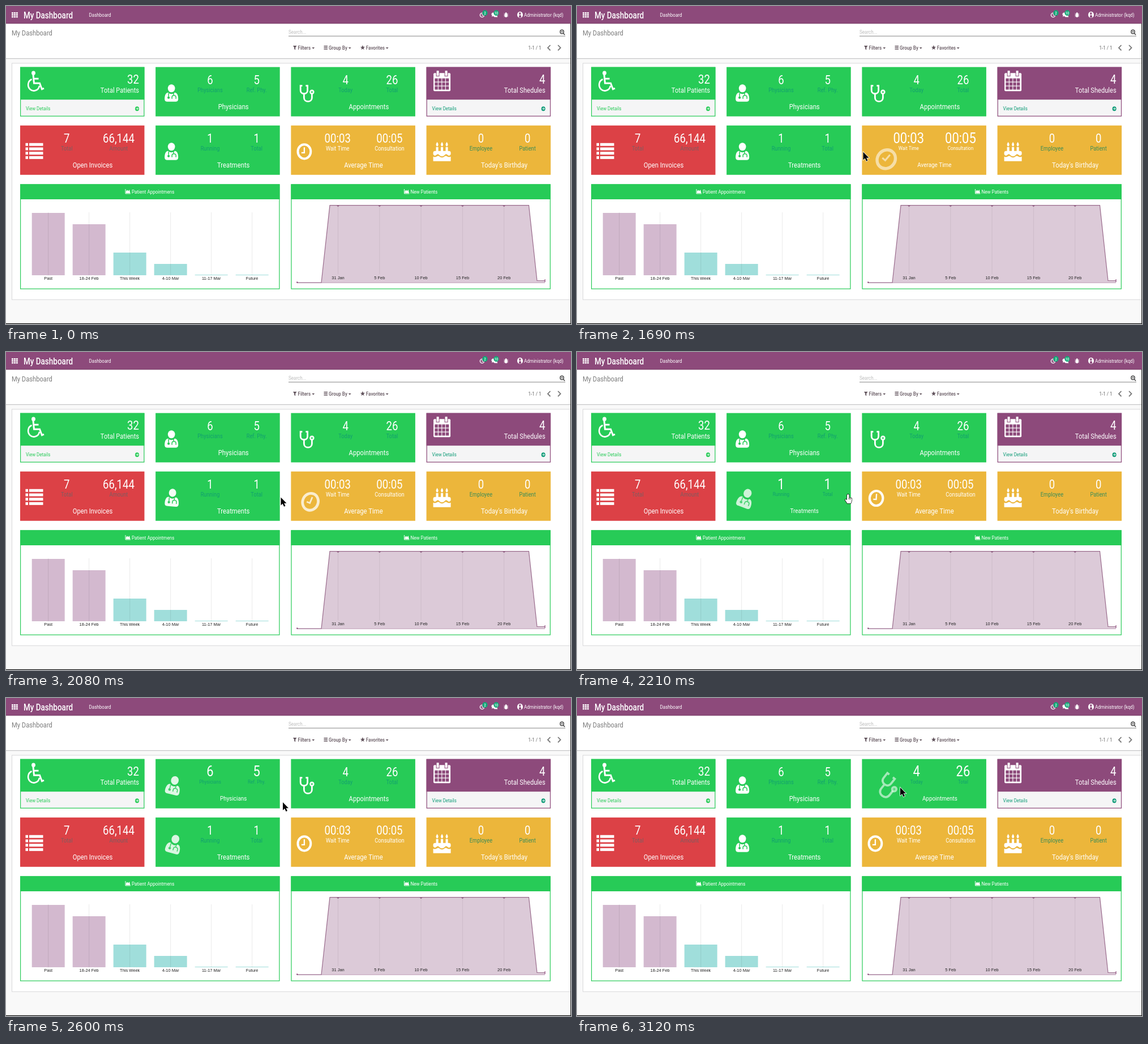
An HTML page with a canvas that plays this animation: 998 by 561 pixels, repeating every 3.25 s.

```html
<!DOCTYPE html>
<html>
<head>
<meta charset="utf-8">
<title>My Dashboard</title>
<style>
html, body { margin: 0; width: 100%; height: 100%; overflow: hidden; background: #f9f9f9; }
canvas { display: block; width: 998px; height: 561px; }
</style>
</head>
<body>
<canvas id="stage" width="998" height="561"></canvas>
<script>
const ctx = document.getElementById('stage').getContext('2d');
const GREEN = '#27cb57', RED = '#dc4146', YELLOW = '#ecb63b', PURPLE = '#8d4a7b', TEAL = '#12a06f';
const SQUEEZE = 0.86; // the whole interface is shown slightly narrowed
const LOOP = 3250, START = 1430, STEP = 130;

function box(x, y, w, h, color) {
  ctx.fillStyle = color;
  ctx.fillRect(x, y, w, h);
}
function frame(x, y, w, h, color, width = 1.2) {
  ctx.strokeStyle = color;
  ctx.lineWidth = width;
  ctx.strokeRect(x, y, w, h);
}
function disc(x, y, r, color, ry = r) {
  ctx.fillStyle = color;
  ctx.beginPath();
  ctx.ellipse(x, y, r, ry, 0, 0, 7);
  ctx.fill();
}
function fill(d, color) {
  ctx.fillStyle = color;
  ctx.fill(new Path2D(d));
}
function line(d, color, width) {
  ctx.strokeStyle = color;
  ctx.lineWidth = width;
  ctx.stroke(new Path2D(d));
}
function text(str, x, y, size, color, align = 'left', weight = 400) {
  ctx.save();
  ctx.translate(x, y);
  ctx.scale(SQUEEZE, 1);
  ctx.font = `${weight} ${size}px Roboto, sans-serif`;
  ctx.textAlign = align;
  ctx.fillStyle = color;
  ctx.fillText(str, 0, 0);
  ctx.restore();
}
function label(str, x, y) {
  ctx.font = '7.5px "Liberation Sans", Arial, sans-serif';
  ctx.textAlign = 'center';
  ctx.fillStyle = '#222';
  ctx.fillText(str, x, y);
}
function at(x, y, draw, turn = 0, scale = 1, alpha = 1) {
  ctx.save();
  ctx.translate(x, y);
  ctx.rotate(turn);
  ctx.scale(scale, scale);
  ctx.globalAlpha = alpha;
  draw();
  ctx.restore();
}

// Icons are drawn around their own centre.
const icons = {
  wheelchair() {
    disc(-4, -14, 3.4, '#fff', 3.8);
    line('M-4.5-11L-3 4H7L11 14.5L14.5 13M-4-4H5', '#fff', 3);
    line('M-7-3A10 10.5 0 1 0 6.5 8.5', '#fff', 2.6);
  },
  doctor() {
    disc(0, -8.5, 6.3, '#fff', 7);
    fill('M-6-1C-10-1-12 4-12 10C-12 14-10 15-7 15H7C10 15 12 14 12 10C12 4 10-1 6-1Q0 4-6-1Z', '#fff');
    line('M-5 0V6M4 0V4M1 10V7Q1 4 4 4Q8 4 8 7V10', GREEN, 1.5);
    disc(-5, 8, 2.1, GREEN);
  },
  stethoscope() {
    line('M-8-13H-11.2V-5C-11.2 3 1.2 3 1.2-5V-13H-2M-5 1V8C-5 17 9 17 9 8V1', '#fff', 2.8);
    disc(9, -2, 4.2, '#fff');
    disc(9, -2, 1.5, GREEN);
  },
  clock() {
    ctx.beginPath();
    ctx.ellipse(0, 0, 11.4, 12.6, 0, 0, 7);
    ctx.strokeStyle = '#fff';
    ctx.lineWidth = 4;
    ctx.stroke();
    line('M0-7.5V2H-5', '#fff', 2.3);
  },
  list() {
    for (let y = -14; y < 14; y += 7.7) {
      box(-15.5, y, 4.5, 5, '#fff');
      box(-9, y, 24.5, 5, '#fff');
    }
  },
  cake() {
    for (const x of [-8.5, 0, 8.5]) {
      box(x - 2, -8, 4, 8, '#fff');
      fill(`M${x}-17Q${x + 4}-11 ${x}-9Q${x - 4}-11 ${x}-17Z`, '#fff');
    }
    fill('M-15.5 5V2Q-15.5-1-12-1H12Q15.5-1 15.5 2V5Q13 9 10 6Q7 3 5 6Q0 11-5 6Q-7 3-10 6Q-13 9-15.5 5Z', '#fff');
    fill('M-15.5 9Q-12 11-8 8Q-6 7-4 9Q0 12 4 9Q6 7 8 8Q12 11 15.5 9V17H-15.5Z', '#fff');
  },
  calendar() {
    fill('M-13-14H13Q15-14 15-12V16Q15 18 13 18H-13Q-15 18-15 16V-12Q-15-14-13-14Z', '#fff');
    for (let r = 0; r < 3; r++)
      for (let c = 0; c < 4; c++) box(-12.7 + c * 6.5, -4.5 + r * 7, 5.4, 5.8, PURPLE);
    for (const x of [-7.5, 7.5]) {
      box(x - 3, -18, 6, 10, PURPLE);
      box(x - 2, -18, 4, 9, '#fff');
    }
  }
};

// lit: steps with the hover style; pose: hover amount from step `from` onwards.
const cards = [
  { col: 0, row: 0, color: GREEN, icon: 'wheelchair', count: 32, title: 'Total Patients', link: GREEN },
  { col: 1, row: 0, color: GREEN, icon: 'doctor', ix: 28, iy: 46, stats: [['6', 'Physicians'], ['5', 'Ref. Phy.']],
    title: 'Physicians', ink: TEAL, lit: [9, 10], from: 9, pose: [.3, .45, .15], shift: [13, 2], grow: .25 },
  { col: 2, row: 0, color: GREEN, icon: 'stethoscope', ix: 28, iy: 46, stats: [['4', 'Today'], ['26', 'Total']],
    title: 'Appointments', ink: TEAL, lit: [12, 13], from: 12, pose: [.4, .85], shift: [21, 2], grow: .4 },
  { col: 3, row: 0, color: PURPLE, icon: 'calendar', count: 4, title: 'Total Shedules', link: '#109c78' },
  { col: 0, row: 1, color: RED, icon: 'list', ix: 25, iy: 45, near: 1, stats: [['7', 'Total'], ['66,144', 'Amount']],
    title: 'Open Invoices', ink: '#7f5c60' },
  { col: 1, row: 1, color: GREEN, icon: 'doctor', ix: 28, iy: 46, stats: [['1', 'Running'], ['1', 'Total']],
    title: 'Treatments', ink: TEAL, lit: [6, 8], from: 5, pose: [.1, .45, .8, .75, .35, .1], shift: [13, 3], grow: .25 },
  { col: 2, row: 1, color: YELLOW, icon: 'clock', ix: 23.5, iy: 46, near: 1, stats: [['00:03', 'Wait Time'], ['00:05', 'Consultation']],
    title: 'Average Time', ink: '#fff', lit: [1, 4], from: 1, pose: [.5, .9, 1, 1, .5, .08], shift: [21.5, 15], grow: .4 },
  { col: 3, row: 1, color: YELLOW, icon: 'cake', ix: 27.5, iy: 46, stats: [['0', 'Employee'], ['0', 'Patient']],
    title: "Today's Birthday", ink: '#3a8c58' }
];

function roundArrow(x, y, color) {
  disc(x, y, 3.5, color, 4);
  line(`M${x - 2} ${y}H${x + 1.6}M${x} ${y - 2}L${x + 2} ${y}L${x} ${y + 2}`, '#fff', 1);
}

function drawCard(card, step) {
  const x = 25 + card.col * 239.2, y = 107.7 + card.row * 103.1;
  if (card.link) {
    box(x, y, 219.5, 87, '#f5f5f6');
    box(x, y, 219.5, 57.5, card.color);
    frame(x + .6, y + .6, 218.3, 86, card.color);
    at(x + 27.5, y + 24.5, icons[card.icon]);
    text(card.count, x + 210, y + 29.7, 21.7, '#fff', 'right');
    text(card.title, x + 210, y + 45.7, 12.9, '#fff', 'right');
    text('View Details', x + 10, y + 76.7, 9.2, card.link);
    roundArrow(x + 206.5, y + 73.5, card.link);
    return;
  }
  box(x, y, 219.5, 87, card.color);
  const p = (card.pose && card.pose[step - card.from]) || 0;
  const [dx, dy] = card.shift || [0, 0];
  const lit = card.lit && step >= card.lit[0] && step <= card.lit[1];
  at(x + card.ix + dx * p, y + card.iy + dy * p, icons[card.icon], p * Math.PI / 4, 1 + (card.grow || 0) * p, 1 - .5 * p);
  card.stats.forEach(([value, name], i) => {
    const cx = x + (card.near ? 82.3 : 96.3) + i * (card.near ? 91.7 : 82.2);
    text(value, cx, y + (lit ? 30.7 : 29.9), lit ? 25.5 : 21.6, '#fff', 'center');
    text(name, cx, y + (lit ? 43.4 : 43.8), lit ? 9.4 : 10.8, card.ink, 'center');
  });
  text(card.title, x + (card.near ? 128 : 137.5), y + (lit ? 73.6 : 74.2), lit ? 11.5 : 13.1, '#fff', 'center');
}

function drawHeader() {
  box(0, 0, 998, 31, PURPLE);
  box(0, 30.5, 998, 1, '#743c65');
  for (let i = 0; i < 9; i++) box(10 + i % 3 * 3.9, 11 + (i / 3 | 0) * 3.4, 3, 2.6, '#fff');
  text('My Dashboard', 31, 21.6, 15.7, '#fff', 'left', 500);
  text('Dashboard', 146.5, 19, 9.4, '#fff');

  ctx.beginPath();
  ctx.arc(841, 16, 3.6, 0, 7);
  ctx.strokeStyle = '#fff';
  ctx.lineWidth = 1.4;
  ctx.stroke();
  line('M841 13.5V16.5H843', '#fff', 1);
  disc(861.5, 14.5, 4, '#fff', 3);
  disc(864.5, 17, 3.5, '#fff', 2.6);
  fill('M859 16L858 19L862 17ZM865 18L868 20.5L867 17Z', '#fff');
  for (const [x, n] of [[846, 2], [866, 10]]) {
    disc(x, 12.3, 4.6, '#13a777', 5);
    text(n, x, 14.7, 6.5, '#fff', 'center', 500);
  }
  disc(883.2, 16.5, 2.5, '#fff', 3.4);
  disc(883.2, 12.8, 1.6, '#fff');
  line('M879.5 13L887 19M887 13L879.5 19M879 16H887.5', '#fff', .8);
  disc(908, 15.5, 5, '#fff', 5.8);
  disc(907.8, 13.2, 1.5, PURPLE, 2.2);
  fill('M906 20.5Q905.5 16 908 16Q910.5 16 910 20.5Z', PURPLE);
  text('Administrator (kqd)', 915, 19, 9.4, '#fff');
}

function drawControls() {
  box(0, 31.5, 998, 61, '#fff');
  box(0, 92, 998, 1.3, '#c9c9cb');
  text('My Dashboard', 10, 51.8, 13, '#7d7d7d');
  text('Search...', 499, 49.2, 9.4, '#bdbdbd');
  box(499, 52.6, 489, 1, '#858585');
  ctx.beginPath();
  ctx.arc(982, 45.5, 3.2, 0, 7);
  ctx.strokeStyle = '#444';
  ctx.lineWidth = 1.4;
  ctx.stroke();
  line('M984.3 48L987 51M980.5 45.5H983.5', '#444', 1.4);

  const gray = '#64565f';
  fill('M507 70H513.5L511.2 73.3V77.5L509.2 76V73.3Z', gray);
  for (const y of [70, 72.7, 75.4]) box(561.5, y, 6.5, 1.4, gray);
  fill('M630 69L631.2 72H634L631.8 74L632.6 77L630 75.4L627.4 77L628.2 74L626 72H628.8Z', gray);
  for (const [name, x, caret] of [['Filters', 515.5, 542.8], ['Group By', 570, 607.2], ['Favorites', 635.8, 673.2]]) {
    text(name, x, 76.8, 9.4, gray, 'left', 500);
    fill(`M${caret - 2.4} 73H${caret + 2.4}L${caret} 75.8Z`, gray);
  }
  text('1-1 / 1', 922.5, 77, 9.4, '#666');
  line('M961.5 69L957 73.7L961.5 78.4M975 69L979.5 73.7L975 78.4', '#777', 1.8);
}

function drawPanel(x, title, iconX) {
  box(x, 314.3, 458.5, 185.2, '#fff');
  frame(x + .6, 315, 457.3, 184, GREEN);
  box(x, 314.3, 458.5, 26.7, GREEN);
  line(`M${iconX} 323V331H${iconX + 9}`, '#fff', 1);
  fill(`M${iconX + 1} 330V327L${iconX + 3} 324.5L${iconX + 5} 326.5L${iconX + 7} 324L${iconX + 8.5} 330Z`, '#fff');
  text(title, iconX + 11, 330.5, 9.4, '#fff');
}

function drawBars() {
  drawPanel(25, 'Patient Appointmens', 211);
  const bars = [['Past', 365], ['18-24 Feb', 385], ['This Week', 435], ['4-10 Mar', 455], ['11-17 Mar', 474], ['Future', 474]];
  bars.forEach(([name, top], i) => {
    const x = 74.7 + i * 72;
    box(x - 29, top, 58, 475 - top, i < 2 ? '#d3b9cf' : '#a0dedb');
    box(x - .5, 364, 1, 111, 'rgba(0,0,0,.085)');
    label(name, x, 482.6);
  });
}

function drawArea() {
  drawPanel(503.4, 'New Patients', 703.5);
  const curve = 'M514 488H557L572 351.7H923.5L938 484.5H952';
  fill(curve + 'V488Z', '#dccad8');
  box(514, 487.8, 438, .8, '#b38ba9');
  ['31 Jan', '5 Feb', '10 Feb', '15 Feb', '20 Feb'].forEach((name, i) => {
    const x = 586.5 + i * 73.3;
    box(x - .5, 352, 1, 121, 'rgba(0,0,0,.07)');
    fill(`M${x - 2.5} 352H${x + 2.5}L${x} 354.3Z`, '#8f5f82');
    label(name, x, 482);
  });
  line(curve, '#9a6c8d', 1.2);
  disc(514.3, 487.5, 1.2, PURPLE);
  line('M952 482V487', PURPLE, 1.2);
}

// Pointer stops: step, x, y.
const stops = [[0, 519, 254], [4, 492, 261], [6, 479, 252], [8, 474, 191], [11, 519, 170], [13, 571, 158]];

function drawPointer(step) {
  if (step < 0) return;
  const i = Math.max(1, stops.findIndex(s => s[0] >= step));
  const [s0, x0, y0] = stops[i - 1], [s1, x1, y1] = stops[i];
  const k = (step - s0) / (s1 - s0);
  const hand = step === 6 || step === 7;
  const shape = hand
    ? 'M-2 1Q-2-1 0-1Q1.5-1 1.5 1V5L6 6Q7 7 6 11L4.5 15H-1.5L-5.5 9Q-5 7-2 9Z'
    : 'M0 0V14L3.2 11L5.6 16.2L8 15L5.6 10.2H10Z';
  at(x0 + (x1 - x0) * k, y0 + (y1 - y0) * k, () => {
    line(shape, hand ? '#111' : '#fff', 1.4);
    fill(shape, hand ? '#fff' : '#000');
    if (hand) line('M1.5 5V8M3.8 6V8.5', '#111', .8);
  });
}

function render(now) {
  const step = Math.floor((now % LOOP - START) / STEP);
  box(0, 0, 998, 561, '#f9f9f9');
  drawHeader();
  drawControls();
  box(10, 101, 988, 417, '#fff');
  frame(10.5, 101, 1000, 417, '#d8d8da', 1);
  for (const card of cards) drawCard(card, step);
  drawBars();
  drawArea();
  drawPointer(step);
  box(0, 559.8, 998, 1.2, '#111');
  box(997, 31, 1, 530, '#222');
}

const begin = performance.now();
function tick() {
  render(performance.now() - begin);
  requestAnimationFrame(tick);
}
tick();
</script>
</body>
</html>
```
